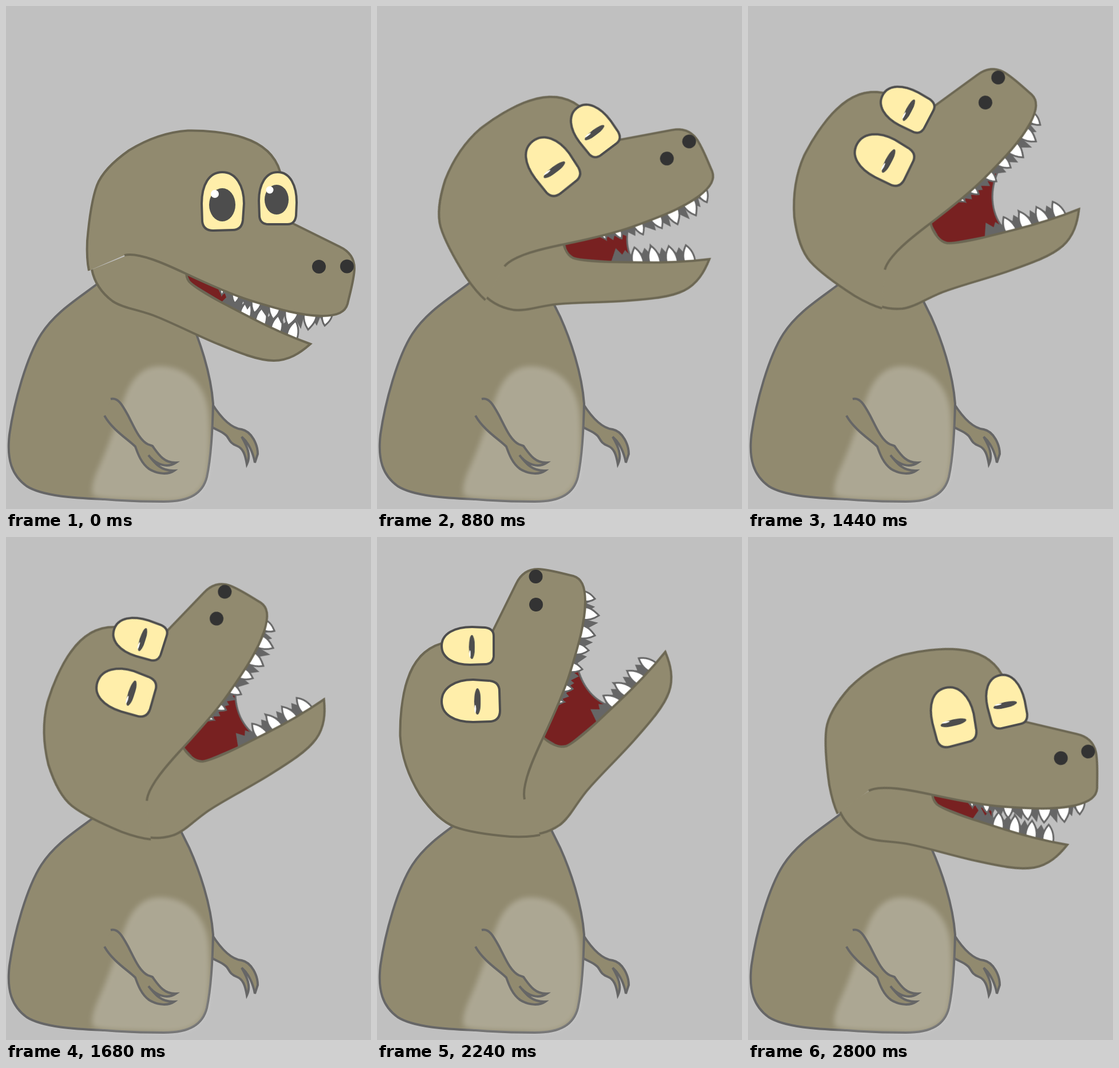
Write an HTML page that moves like this. It is 638 by 878 pixels and loops after 2880 ms.

```html
<!DOCTYPE html>
<html lang="en">
<head>
<meta charset="utf-8">
<title>Dinosaur</title>
<style>
  html, body { margin: 0; width: 100%; height: 100%; overflow: hidden; background: #c0c0c0; }
  svg { display: block; width: 100vw; height: 100vh; }

  .skin { fill: #918a6f; stroke-width: 4; }
  .body { stroke: #666; }
  .face { stroke: #6c6753; }
  .gum { fill: #666; stroke: #666; stroke-width: 2; }
  .tooth { fill: #fff; stroke: #666; stroke-width: 3; }
  .throat { fill: #782121; stroke: #666; stroke-width: 3; }
  .eye { fill: #fea; stroke: #4d4d4d; stroke-width: 4; }
  .pupil { fill: #4d4d4d; }
  .glint { fill: #fff; }
  .nostril { fill: #333; }

  .head, .jaw, .blink { animation: 2880ms infinite; }
  .head { transform-origin: 244px 421px; animation-name: head; }
  .jaw { transform-origin: 244px 415px; animation-name: jaw; }
  .blink { animation-name: blink; }
  .left { transform-origin: 378px 354px; }
  .right { transform-origin: 473px 344px; }

  /* 36 poses per loop, 80 ms each */
  @keyframes head {
    0% { transform: rotate(0deg); animation-timing-function: steps(5); }
    13.88% { transform: rotate(-16.8deg); animation-timing-function: steps(6); }
    30.55% { transform: rotate(-36.9deg); animation-timing-function: steps(7); }
    49.99% { transform: rotate(-62.3deg); animation-timing-function: steps(6); }
    66.66% { transform: rotate(-82.5deg); animation-timing-function: steps(2); }
    72.22% { transform: rotate(-89.3deg); animation-timing-function: steps(2); }
    77.77% { transform: rotate(-90deg); animation-timing-function: steps(1); }
    80.55% { transform: rotate(-88deg); animation-timing-function: steps(6); }
    97.22% { transform: rotate(-13deg); animation-timing-function: steps(1); }
    100% { transform: rotate(0deg); }
  }
  @keyframes jaw {
    0% { transform: translate(0px) rotate(0deg); animation-timing-function: steps(5); }
    13.88% { transform: translate(0px) rotate(-14.5deg); animation-timing-function: steps(6); }
    30.55% { transform: translate(1px) rotate(-26.7deg); animation-timing-function: steps(7); }
    49.99% { transform: translate(3px) rotate(-41.6deg); animation-timing-function: steps(6); }
    66.66% { transform: translate(0px) rotate(-66.9deg); animation-timing-function: steps(2); }
    72.22% { transform: translate(0px) rotate(-70.5deg); animation-timing-function: steps(2); }
    77.77% { transform: translate(0px) rotate(-70.8deg); animation-timing-function: steps(1); }
    80.55% { transform: translate(0px) rotate(-69deg); animation-timing-function: steps(6); }
    97.22% { transform: translate(0px) rotate(-10deg); animation-timing-function: steps(1); }
    100% { transform: translate(0px) rotate(0deg); }
  }
  @keyframes blink {
    0%, 19.44% { transform: scaleY(1); animation-timing-function: steps(2); }
    24.99%, 100% { transform: scaleY(.2); }
  }
</style>
</head>
<body>
<svg viewBox="0 0 638 878">
  <defs>
    <filter id="soft" x="-20%" y="-20%" width="140%" height="140%">
      <feGaussianBlur stdDeviation="5"/>
    </filter>
    <path id="fang" d="M-9 5C-11 -9 -8 -18 0 -28C7 -20 11 -9 9 5Z"/>
  </defs>

  <g class="skin body">
    <path d="M360 694C374 716 392 737 412 739C430 743 440 766 440 782L435 797C432 780 424 762 412 752C421 768 429 784 421 800C418 782 414 772 404 768C388 762 390 752 383 748C376 742 368 740 360 735"/>
    <path d="M175 473L157 487C115 518 84 538 62 572C36 612 14 692 6 748C1 792 10 819 36 838C66 857 128 859 172 861C208 864 242 865 276 865C322 865 344 850 351 822C358 790 361 740 362 694C358 640 338 582 320 542L290 482"/>
  </g>
  <path d="M268 629C238 629 217 652 205 690C196 722 184 752 173 780C162 808 148 830 151 852C156 862 200 861 276 864C318 866 342 852 351 822C358 785 357 740 354 708C348 660 315 629 268 629Z" fill="#fff" opacity=".25" filter="url(#soft)"/>
  <path class="skin body" d="M183 686C196 683 203 696 213 714C224 735 233 758 248 765L256 768C265 780 275 798 297 797C282 807 262 801 249 784C261 799 271 812 294 811C284 818 266 818 250 808C236 798 230 780 226 769C214 757 186 740 172 715"/>

  <g class="jaw">
    <path class="throat" d="M322 430L314 468L322 484L378 518L411 534V525C413 492 436 460 476 444L440 400Z"/>
    <path class="gum" d="M377 518L394 501L399 516L407 511L411 524L424 513L431 530L439 523L443 535L451 521L458 545L466 536L470 550L479 537L485 556L493 549L497 562L506 550L508 582L440 556Z"/>
    <g class="tooth">
      <use href="#fang" transform="translate(418 540) rotate(13)"/>
      <use href="#fang" transform="translate(445 551) rotate(13)"/>
      <use href="#fang" transform="translate(472 565) rotate(14)"/>
      <use href="#fang" transform="translate(500 577) rotate(13)"/>
    </g>
    <path class="skin face" d="M150 460C154 480 166 500 186 515C205 528 238 531 265 543C297 556 332 574 368 589C402 603 440 619 468 619C494 619 514 606 532 590C496 577 456 559 420 540L376 517C350 503 330 491 320 481C312 471 314 450 322 436L250 420"/>
  </g>

  <g class="head">
    <path class="gum" d="M370 490L377 504L383 500L387 511L393 506L400 518L405 512L410 520L415 514L422 528L428 520L434 535L445 526L456 542L460 532L467 547L474 537L481 552L487 538L493 557L504 540L515 561L520 541L528 564L536 544L543 556L549 541L557 557L570 538L530 530L430 505Z"/>
    <g class="tooth">
      <path d="M571 536C569 548 563 553 557 558C553 552 551 546 553 536Z"/>
      <path d="M543 536C543 550 535 558 528 565C522 556 519 547 521 535Z"/>
      <path d="M511 530C511 545 501 552 493 558C489 550 486 541 489 528Z"/>
      <path d="M479 524C479 536 473 541 467 547C462 540 459 533 460 520Z"/>
      <path d="M447 514C446 525 440 531 434 536C430 530 428 523 430 510Z"/>
      <path d="M409 502C408 511 404 515 400 519C396 514 395 508 395 500Z"/>
      <path d="M382 495L377 505L374 494Z" stroke-width="2"/>
    </g>
    <path class="skin face" d="M207 435C232 429 280 451 314 467C350 484 392 503 430 515C470 527 510 540 552 541C580 541 593 534 597 520C600 506 609 476 609 458C609 440 600 428 583 420L500 379L479 289C470 259 446 240 415 230C385 220 345 217 318 217.500C280 220 246 233 215 252C188 271 168 290 159 313C149 340 145 375 142 410C141 432 142 448 145 462"/>
    <circle class="nostril" cx="547" cy="455" r="12"/>
    <circle class="nostril" cx="596" cy="454.500" r="12"/>

    <path class="eye" d="M342 345C342 312 355 290 378 290C402 290 416 314 416 345L414 374Q412 391 396 391L362 392Q345 392 343 376Z"/>
    <g class="blink left">
      <ellipse class="pupil" cx="378" cy="347" rx="23" ry="29"/>
      <circle class="glint" cx="365" cy="328" r="7"/>
    </g>
    <path class="eye" d="M442 340C442 311 454 290 475 290C497 290 508 314 508 343L507 366Q505 381 492 381H459Q445 381 443 368Z"/>
    <g class="blink right">
      <ellipse class="pupil" cx="473" cy="338" rx="21" ry="26"/>
      <circle class="glint" cx="461" cy="321" r="6.500"/>
    </g>
  </g>
</svg>
</body>
</html>
```
